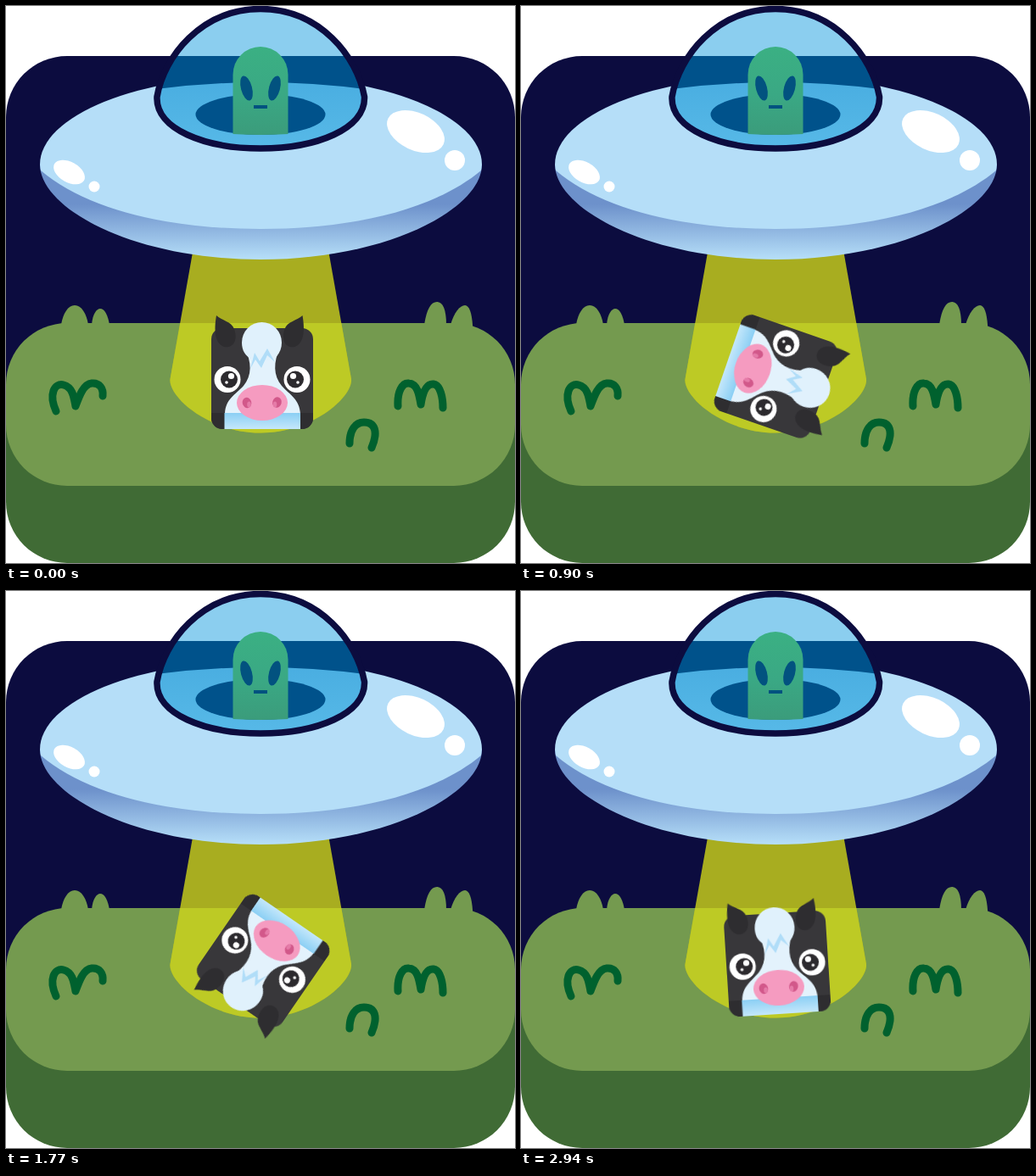
Animation of 600x657 px, one loop 2.97 s. Source, as an HTML page:

```html
<!DOCTYPE html>
<html lang="en">
<head>
<meta charset="utf-8">
<title>Abduction</title>
<style>
  html, body { margin: 0; width: 100%; height: 100%; overflow: hidden; background: #fff; }
  svg { display: block; width: 600px; height: 657px; }
  #cow { transform-origin: 302px 437.6px; }
</style>
</head>
<body>
<svg viewBox="0 0 600 657">
  <defs>
    <linearGradient id="belly" gradientUnits="userSpaceOnUse" x1="0" y1="234" x2="0" y2="298">
      <stop offset="0" stop-color="#6d91cb"/><stop offset="1" stop-color="#b5def8"/>
    </linearGradient>
    <linearGradient id="skin" x1="0" y1="0" x2="0" y2="1">
      <stop offset="0" stop-color="#3bb083"/><stop offset=".55" stop-color="#3aa884"/><stop offset="1" stop-color="#3b9c7b"/>
    </linearGradient>
    <linearGradient id="floor" x1="0" y1="0" x2="0" y2="1">
      <stop offset="0" stop-color="#4aaee1"/><stop offset="1" stop-color="#58bae8"/>
    </linearGradient>
    <linearGradient id="chin" x1="0" y1="0" x2="0" y2="1">
      <stop offset="0" stop-color="#8bcff4"/><stop offset="1" stop-color="#c4e7fb"/>
    </linearGradient>
    <path id="beam" d="M221 285 L193.500 440 C191 461 239 503.500 300 503.500 C361 503.500 409 461 407 440 L379.500 285Z"/>
    <path id="dome" d="M178 107 C186 60 230 3.500 300 3.500 C370 3.500 414 60 422.500 107 C424 145 366 168 300 168 C234 168 176 145 178 107Z"/>
    <path id="ear" d="M248 365 C254 371 266 372 269 381 C274 395 267 404 257 402 C246 398 245 382 248 365Z"/>
    <clipPath id="inDome"><use href="#dome"/></clipPath>
    <clipPath id="onGround"><rect y="374" width="600" height="140"/></clipPath>
    <clipPath id="inHead"><rect x="242" y="380" width="120" height="119" rx="13"/></clipPath>
  </defs>

  <!-- night and meadow -->
  <rect y="59" width="600" height="480" rx="72" fill="#0c0c3f"/>
  <path d="M0 470 H600 V585 A72 72 0 0 1 528 657 H72 A72 72 0 0 1 0 585Z" fill="#406b35"/>
  <g fill="#749a4f">
    <rect y="374" width="600" height="192" rx="72"/>
    <path d="M65 376 C67 363 73 353 81 353 C89 353 95 363 97 376Z"/>
    <path d="M101 376 C102 363 107 357 111 357 C116 357 120 364 122 376Z"/>
    <path d="M493 376 C496 357 501 349 508 349 C515 349 519 358 519 376Z"/>
    <path d="M524 376 C528 362 535 353 541 353 C546 353 549 362 550 376 V385 H524Z"/>
  </g>
  <g fill="none" stroke="#00612e" stroke-width="9" stroke-linecap="round" stroke-linejoin="round">
    <path d="M59 478 C50 458 57 444 68 447 C79 450 80 462 82 472 C86 461 91 446 101 445 C110 444 115 451 114 460"/>
    <path d="M462 472 C461 455 467 444 475 445 C485 446 487 458 489 470 C491 457 495 445 504 446 C512 447 515 462 515 474"/>
    <path d="M405 516 C405 500 412 491 422 491 C435 491 439 502 431 521"/>
  </g>

  <use href="#beam" fill="#a8ad20"/>
  <use href="#beam" fill="#bdca25" clip-path="url(#onGround)"/>

  <!-- saucer -->
  <path d="M40 187 C40 239 150 299 300 299 C450 299 561 239 561 187Z" fill="url(#belly)"/>
  <path d="M40 187 A260.500 105 0 0 1 561 187 L560 194 C505 240 410 263 300 263 C190 263 95 240 41 194Z" fill="#b5def8"/>
  <g fill="#fff">
    <ellipse cx="483" cy="148" rx="36" ry="22" transform="rotate(25 483 148)"/>
    <circle cx="529" cy="182" r="12"/>
    <ellipse cx="74.500" cy="196" rx="20" ry="12" transform="rotate(29 74.500 196)"/>
    <circle cx="104" cy="213" r="6.500"/>
  </g>

  <!-- dome and pilot -->
  <g clip-path="url(#inDome)">
    <rect x="170" width="260" height="59" fill="#8bceef"/>
    <rect x="170" y="59" width="260" height="60" fill="#00528b"/>
    <path d="M170 99 Q300 81 430 99 V175 H170Z" fill="url(#floor)"/>
    <ellipse cx="300" cy="128" rx="76.500" ry="24" fill="#00528b"/>
    <path d="M267.500 151 V81 A32.500 33 0 0 1 332.500 81 V151 Q300 153 267.500 151Z" fill="url(#skin)"/>
    <g fill="#02527f">
      <ellipse cx="283.500" cy="97" rx="6.500" ry="15" transform="rotate(-15 283.500 97)"/>
      <ellipse cx="316.500" cy="97" rx="6.500" ry="15" transform="rotate(15 316.500 97)"/>
      <rect x="292" y="117" width="16" height="4"/>
    </g>
  </g>
  <use href="#dome" fill="none" stroke="#0c0c3f" stroke-width="7.500"/>

  <g id="cow">
    <g clip-path="url(#inHead)">
      <rect x="242" y="380" width="120" height="119" fill="#38373a"/>
      <rect x="242" y="480" width="120" height="19" fill="#2e2d30"/>
      <path d="M281 403 C290 420 290 436 280 448 C270 459 259 463 258 481 H347 C346 464 335 459 325 448 C315 436 315 420 323 403Z" fill="#e3f2fc"/>
      <rect x="257.500" y="480" width="89.500" height="19" fill="url(#chin)"/>
    </g>
    <g fill="#2e2d30">
      <use href="#ear"/>
      <use href="#ear" transform="matrix(-1 0 0 1 597.500 0)"/>
    </g>
    <path d="M278 397 A23.500 24 0 0 1 325 397 C325 410 316 418 309 418 L289 416 C282 413 278 406 278 397Z" fill="#e0f1fc"/>
    <path d="M288 428 L293 409 L299 419 L308 404 L317 420 L308 412 L301 427 L294 417Z" fill="#b0ddf8"/>
    <g id="eyes"></g>
    <ellipse cx="302" cy="468" rx="30" ry="21" fill="#f59bc0"/>
    <g fill="#d2588a">
      <ellipse cx="284" cy="468" rx="5.300" ry="6.200" transform="rotate(-15 284 468)"/>
      <ellipse cx="319.500" cy="467.500" rx="5.300" ry="6.200" transform="rotate(15 319.500 467.500)"/>
    </g>
    <g fill="#e57ba8">
      <ellipse cx="286.500" cy="470" rx="2.300" ry="3.600"/>
      <ellipse cx="317" cy="470" rx="2.300" ry="3.600"/>
    </g>
  </g>
</svg>
<script>
  // side: 1 looks right, -1 looks left
  const eye = (x, side) => `
    <circle cx="${x}" cy="440.500" r="15.500" fill="#fff"/>
    <circle cx="${x + side * 2}" cy="440.500" r="10" fill="#2c2a2e"/>
    <circle cx="${x + side * 4.5}" cy="436.500" r="3.600" fill="#fff"/>
    <circle cx="${x - side}" cy="444" r="1.800" fill="#fff"/>`;
  document.getElementById('eyes').innerHTML = eye(261, 1) + eye(343, -1);

  // One full turn, in 30 ms ticks.
  const loop = 2970, tick = 30;
  document.getElementById('cow').animate(
    [{ transform: 'rotate(0deg)' }, { transform: 'rotate(360deg)' }],
    { duration: loop, iterations: Infinity, easing: `steps(${loop / tick}, end)` }
  );
</script>
</body>
</html>
```
